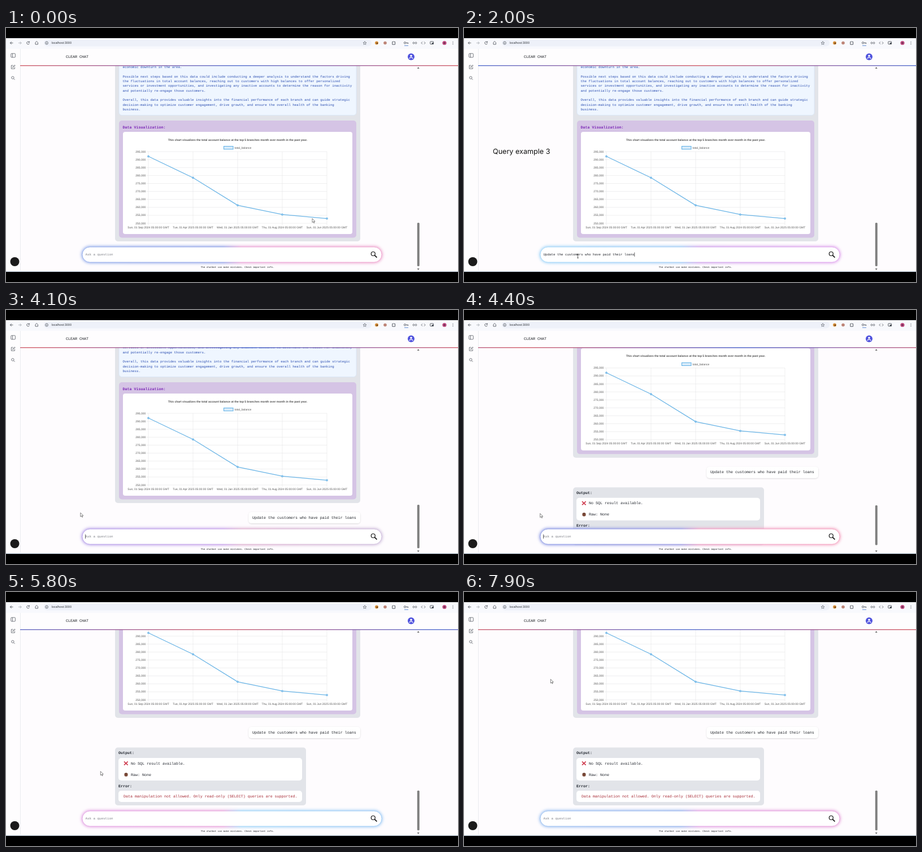
Animation of 800x450 px, one loop 8000 ms. Source, as an HTML page:

```html
<!DOCTYPE html>
<html lang="en">
<head>
<meta charset="utf-8">
<title>Chat with data</title>
<style>
html, body { margin: 0; width: 100%; height: 100%; overflow: hidden; background: #000; }
svg { display: block; width: 800px; height: 450px; }
text { white-space: pre; text-rendering: geometricPrecision; }
.mono { font-family: "Liberation Mono", monospace; }
.sans { font-family: "Liberation Sans", sans-serif; }
.title { font-family: Inter, sans-serif; }
</style>
</head>
<body>
<svg id="stage" viewBox="0 0 800 450"></svg>
<script>
const LOOP = 8000, CUTS = [1250, 7550], BLUR_HALF = 250;
const PROMPT = 'Update the customers who have paid their loans';

const rect = (x, y, w, h, fill, r = 0, more = '') =>
  `<rect x="${x}" y="${y}" width="${w}" height="${h}" rx="${r}" fill="${fill}" ${more}/>`;
const circle = (x, y, r, fill, more = '') =>
  `<circle cx="${x}" cy="${y}" r="${r}" fill="${fill}" ${more}/>`;
const line = (d, color, w = 0.8, more = '') =>
  `<path d="${d}" fill="none" stroke="${color}" stroke-width="${w}" ${more}/>`;
// y is the middle of the lowercase letters
const text = (x, y, str, size, fill, cls = 'mono', more = '') =>
  `<text x="${x}" y="${y + size * 0.31}" font-size="${size}" fill="${fill}" class="${cls}" ${more}>${str}</text>`;
const BOLD = 'font-weight="700"', MID = 'text-anchor="middle"', END = 'text-anchor="end"';

function browserBar() {
  const ink = '#444a52';
  return rect(-20, 18, 840, 19, '#f8f9fd') + rect(67, 20.5, 580, 12, '#eef1f9', 6) +
    line('M12.5 26.5H7.5M9.8 24L7.3 26.5L9.8 29', ink) +
    line('M22 26.5H27M24.7 24L27.2 26.5L24.7 29', '#a5a9b0') +
    line('M41 25A2.4 2.4 0 1 0 41.4 27.2M41.4 23.5V25.5H39.4', ink) +
    line('M52 29V25.6L54.2 23.6L56.4 25.6V29Z', ink) +
    circle(72, 26.5, 2.5, 'none', `stroke="${ink}" stroke-width=".7"`) + line('M72 26V28M72 24.8V25.4', ink, 0.7) +
    text(80.5, 26.7, 'localhost:3000', 5.5, '#33373d', 'sans') +
    line('M635 23.6L635.8 25.6L638 25.8L636.3 27.2L636.9 29.3L635 28.1L633.1 29.3L633.7 27.2L632 25.8L634.2 25.6Z', ink, 0.6) +
    circle(656, 26.5, 3, '#d8913a') + circle(656.8, 27, 1.3, '#5a3a20') + circle(671, 26.5, 2.8, '#bd8578') +
    line('M683.8 24.4H685.2A1 1 0 0 1 687 24.4H688.6V29.2H683.8Z', ink, 0.9) +
    circle(706, 26.3, 1.6, 'none', `stroke="${ink}" stroke-width=".8"`) + line('M707.6 26.3H711.8V28M710 26.3V27.6', ink) +
    rect(705, 30.7, 7, 0.9, '#4c7fd0') +
    line('M722.5 25H721.6A1.5 1.5 0 0 0 721.6 28H722.5M724.5 25H725.4A1.5 1.5 0 0 1 725.4 28H724.5M722 26.5H725', ink) +
    line('M737 24.4L735 26.5L737 28.6M740 24.4L742 26.5L740 28.6', ink) +
    rect(750.8, 24, 5.8, 4.6, 'none', 0.6, `stroke="${ink}" stroke-width=".9"`) + rect(753.8, 26, 2.8, 2.6, ink) +
    circle(776, 26.5, 3.6, '#c04a80') + circle(776, 26.5, 1.5, '#63304f') +
    [24.3, 26.5, 28.7].map(y => circle(791, y, 0.6, ink)).join('');
}

function pageFrame() {
  const ink = '#555a63';
  return rect(-20, 37, 840, 30, '#fefdfe') + rect(-20, 37, 45, 395, '#fefdfe') +
    rect(25, 37, 0.7, 393, '#e3e4e8') +
    rect(8.8, 45.2, 7.6, 6.8, 'none', 1, `stroke="${ink}" stroke-width=".8"`) + line('M11.4 45.2V52', ink) +
    line('M12.5 66.2H9.4V72.2H15.4V69.4M11.8 70L12.2 68.6L15.4 65.6L16.2 66.4L13 69.6Z', ink) +
    circle(11.9, 88, 2.2, 'none', `stroke="${ink}" stroke-width=".8"`) + line('M13.5 89.7L15.6 91.8', ink) +
    text(106, 51, 'CLEAR CHAT', 6.67, '#15181d') +
    circle(717, 51, 6, '#4f52dd') + circle(717, 49.2, 1.8, '#fff') +
    line('M713.9 54.4A3.2 3 0 0 1 720.1 54.4', '#fff', 1.2) +
    rect(25, 66, 795, 1.3, 'url(#rule)') +
    circle(15.5, 414, 8, '#1b1b1b');
}

function chart() {
  const left = 252, top = 219, stepX = 79, stepY = 127 / 9;
  const yOf = v => top + (295 - v) * 127 / 45;
  const points = [292, 278.6, 261.3, 255.5, 253].map((v, i) => [left + i * stepX, yOf(v)]);
  const days = ['Sun, 01 Sep 2024', 'Tue, 01 Apr 2025', 'Wed, 01 Jan 2025', 'Thu, 01 Aug 2024', 'Sun, 01 Jun 2025'];
  let out = rect(207, 184, 406, 181, '#fff', 4) +
    text(410, 198, 'This chart visualizes the total account balance at the top 5 branches month over month in the past year.',
      5, '#4a4a4a', 'sans', BOLD + MID.padStart(MID.length + 1)) +
    rect(385.5, 209.6, 16.5, 5.2, '#d9ecfa', 0, 'stroke="#5aaee6"') +
    text(404.5, 212.3, 'total_balance', 5, '#555', 'sans');
  for (let i = 0; i < 10; i++) {
    const y = top + i * stepY;
    out += line(`M248.5 ${y}H568`, '#e4e4e6', 0.6) +
      text(247.3, y, `${295 - i * 5},000`, 5, '#555', 'sans', END);
  }
  days.forEach((d, i) => {
    const x = left + i * stepX;
    out += line(`M${x} ${top}V349`, '#e4e4e6', 0.6) +
      text(x, 353, d + ' 05:00:00 GMT', 5, '#555', 'sans', MID);
  });
  return out + line('M' + points.join('L'), '#69b4e6', 1.25) +
    points.map(([x, y]) => circle(x, y, 1.6, '#8fc6ec', 'stroke="#5aaee6" stroke-width=".6"')).join('');
}

function report() {
  const lines = ['economic downturn in the area.', '',
    'Possible next steps based on this data could include conducting a deeper analysis to understand the factors driving',
    'the fluctuations in total account balances, reaching out to customers with high balances to offer personalized',
    'services or investment opportunities, and investigating any inactive accounts to determine the reason for inactivity',
    'and potentially re-engage those customers.', '',
    'Overall, this data provides valuable insights into the financial performance of each branch and can guide strategic',
    'decision-making to optimize customer engagement, drive growth, and ensure the overall health of the banking',
    'business.'];
  return rect(193, 20, 434, 358, '#e2e4e9', 5) +
    rect(200, 20, 420, 134.5, '#eff6ff', 5, 'stroke="#d3e4fa" stroke-width=".6"') +
    lines.map((s, i) => text(206.5, 69.2 + i * 8.33, s, 5.83, '#2a4db0')).join('') +
    rect(200, 164, 420, 207.5, '#d5c4e5', 5) +
    text(206.5, 175.8, 'Data Visualization:', 6.67, '#7a25b5', 'mono', BOLD) + chart();
}

function answer() {
  return rect(193, 430.5, 338, 102.5, '#e2e4e9', 5) +
    text(199, 440, 'Output:', 6.67, '#20252e', 'mono', BOLD) + rect(199, 449, 325, 40, '#fff', 5) +
    line('M209 455.3L215.6 461.7M215.6 455.3L209 461.7', '#cf3d50', 1.7) +
    text(221, 458.6, 'No SQL result available.', 6.67, '#22262e') +
    rect(209.5, 475.4, 6, 6.4, '#7c4a38', 2.2) + line('M211.2 475.6V478M213.2 475.4V478', '#4f2c22', 0.6) +
    text(221, 478.6, 'Raw: None', 6.67, '#22262e') +
    text(199, 498.5, 'Error:', 6.67, '#20252e', 'mono', BOLD) + rect(199, 507, 325, 20, '#fff', 5) +
    text(208, 517, 'Data manipulation not allowed. Only read-only (SELECT) queries are supported.', 6.67, '#a52530');
}

function inputBar() {
  return rect(133.5, 386.5, 533, 30, 'url(#glow)', 15, 'filter="url(#soft)"') +
    rect(135, 388, 530, 27, '#fff', 13.5, 'stroke="url(#glow)" stroke-width=".8"') +
    text(140.5, 401.3, 'Ask a question', 5.83, '#80838a', 'mono', 'id="hint"') +
    text(140.5, 401.3, PROMPT, 5.83, '#25282e', 'mono', 'id="typed"') +
    rect(301.5, 397.6, 0.7, 7.4, '#222', 0, 'id="caret"') +
    circle(649.8, 400, 3.5, 'none', 'stroke="#151515" stroke-width="1.2"') + line('M652.4 402.7L656.4 406.7', '#151515', 1.7) +
    text(409.7, 423.6, 'The chatbot can make mistakes. Check important info.', 4.17, '#15181d', 'mono', MID);
}

stage.innerHTML = `
<defs>
  <linearGradient id="rule" gradientUnits="userSpaceOnUse" x1="25" x2="800" spreadMethod="repeat">
    <stop stop-color="#cf5560"/><stop offset=".25" stop-color="#94599a"/><stop offset=".5" stop-color="#4a66cc"/>
    <stop offset=".75" stop-color="#94599a"/><stop offset="1" stop-color="#cf5560"/>
  </linearGradient>
  <linearGradient id="glow" gradientUnits="userSpaceOnUse" x1="135" x2="665">
    <stop/><stop offset=".47"/><stop offset=".53"/><stop offset="1"/>
  </linearGradient>
  <filter id="soft" x="-5%" y="-60%" width="110%" height="220%"><feGaussianBlur stdDeviation="2.4"/></filter>
  <filter id="shade" x="-10%" y="-50%" width="120%" height="200%"><feDropShadow dx="0" dy=".8" stdDeviation="1.3" flood-opacity=".17"/></filter>
  <clipPath id="view"><rect x="26" y="67" width="774" height="350"/></clipPath>
</defs>
<g id="film">
  ${rect(-20, 18, 840, 414, '#fefcfe')}
  <g clip-path="url(#view)"><g id="feed">
    ${report()}
    <g id="bubble">${rect(429.5, 394, 197.5, 20, '#fff', 5, 'filter="url(#shade)"')}
    ${text(436, 403.6, PROMPT, 6.67, '#1d2026')}</g>
    <g id="answer">${answer()}</g>
  </g></g>
  <path d="M727.7 72L729.7 69L731.7 72ZM727.7 426L729.7 429L731.7 426Z" fill="#707070"/>
  ${rect(727.8, 345, 4, 77, '#808080', 1.5, 'id="thumb"')}
  ${browserBar()}${pageFrame()}${inputBar()}
  ${rect(-20, 430.3, 840, 1.7, '#dce6f1')}
  ${text(51, 219.5, 'Query example 3', 12.6, '#111', 'title', 'id="label"')}
  <path id="arrow" d="M0 0V7L1.7 5.5L2.9 8L4 7.5L2.8 5.1H5Z" fill="#fff" stroke="#333" stroke-width=".6"/>
  <path id="beam" d="M-1.3 -3.5H1.3M0 -3.5V3.5M-1.3 3.5H1.3" stroke="#222" stroke-width=".7"/>
  ${rect(-20, -20, 840, 38, '#000')}${rect(-20, 432, 840, 40, '#000')}
</g>`;

const $ = id => document.getElementById(id);
const show = (id, on) => $(id).setAttribute('visibility', on ? 'visible' : 'hidden');
const ease = p => { p = Math.min(1, Math.max(0, p)); return p * p * (3 - 2 * p); };

// keys: [time, value, value...], linear in between
function track(keys, t) {
  const i = keys.findIndex(k => k[0] > t);
  if (i < 0) return keys[keys.length - 1].slice(1);
  if (i === 0) return keys[0].slice(1);
  const [a, b] = [keys[i - 1], keys[i]], p = (t - a[0]) / (b[0] - a[0]);
  return a.slice(1).map((v, k) => v + (b[k + 1] - v) * p);
}

const POINTER = [[0, 542, 337.5], [1249, 542, 337.5], [1250, 201.5, 404], [2600, 201.5, 404], [3100, 127, 357],
  [3600, 127, 357], [4400, 134.7, 360.5], [4700, 134.7, 360.5], [5500, 167.3, 317.7], [6200, 167.3, 317.7], [7500, 153.3, 154.5]];
const TURN = [[0, 0.7], [2000, -4], [3400, -5.4], [4400, -7], [5800, -9.8], [8000, -11.7]];
const RING = [[158, 212, 248], [138, 152, 228], [222, 160, 236], [244, 160, 190]];

function ringColor(p) {
  p = ((p % 4) + 4) % 4;
  const i = Math.floor(p), a = RING[i], b = RING[(i + 1) % 4];
  return `rgb(${a.map((v, k) => Math.round(v + (b[k] - v) * (p - i)))})`;
}

function draw(t) {
  const written = t >= CUTS[0] && t < 3700, answered = t >= 4200;
  show('hint', !written);
  show('typed', written);
  show('label', t >= CUTS[0] && t < 3700);
  show('bubble', t >= 3700);
  show('answer', answered);
  $('caret').setAttribute('x', written ? 301.5 : 140.3);
  show('caret', t >= CUTS[0] && t < 4700 && (t - 1900) % 1000 < 700);

  const scroll = 36 * ease((t - 3700) / 300) + 119 * ease((t - 4200) / 325);
  $('feed').setAttribute('transform', `translate(0 ${-scroll})`);
  const thumb = answered ? 70.5 : 77;
  $('thumb').setAttribute('height', thumb);
  $('thumb').setAttribute('y', answered ? 351.7 - (155 - scroll) * 0.15 : 345);

  const [x, y] = track(POINTER, t), beam = t >= CUTS[0] && t < 2750;
  show('beam', beam);
  show('arrow', !beam && !(t > 1050 && t < CUTS[0]));
  $(beam ? 'beam' : 'arrow').setAttribute('transform', `translate(${x} ${y})`);

  const [turn] = track(TURN, t);
  document.querySelectorAll('#glow stop').forEach((s, i) =>
    s.setAttribute('stop-color', ringColor(turn + [0, 0.2, 1.8, 2][i])));
  $('rule').setAttribute('gradientTransform', `translate(${775 * t / 4000} 0)`);

  const blur = Math.max(...CUTS.map(c => 2.4 * (1 - Math.abs(t - c) / BLUR_HALF)));
  $('film').style.filter = blur > 0.02 ? `blur(${blur}px)` : 'none';
}

function tick() {
  draw(performance.now() % LOOP);
  requestAnimationFrame(tick);
}
tick();
</script>
</body>
</html>
```
